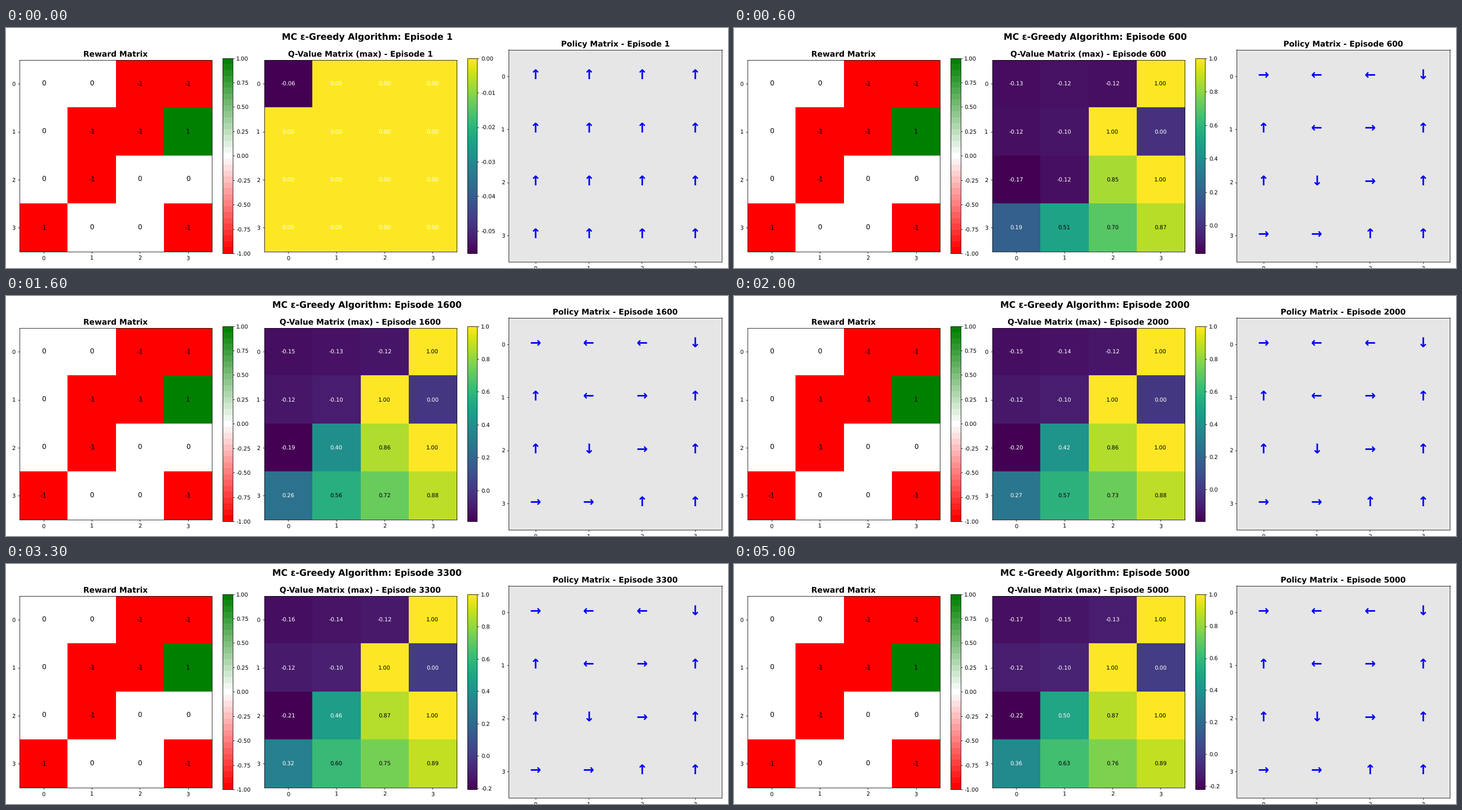
A matplotlib script for the animation above (5.55 s loop, 1280 by 427 pixels).

```python
import numpy as np
import matplotlib.pyplot as plt
from matplotlib.animation import FuncAnimation
from matplotlib.colors import LinearSegmentedColormap

W, H, DPI = 1280, 427, 64
S = W / 18 / DPI          # point sizes are meant for an 18 inch wide figure
STEPS, HOLD = 100, 11     # learning steps, then ticks on the final state
BATCH = 50                # episodes per step

plt.rcParams.update({
    "font.family": "DejaVu Sans",
    "font.size": 10 * S,
    "text.hinting": "no_hinting",
    "axes.linewidth": 0.8 * S,
    "axes.titlesize": 14 * S,
    "axes.titleweight": "bold",
    "axes.titlepad": 6 * S,
    "axes.unicode_minus": False,
})
for axis in ("xtick", "ytick"):
    plt.rcParams.update({
        f"{axis}.major.size": 3.5 * S,
        f"{axis}.major.pad": 3.5 * S,
        f"{axis}.major.width": 0.8 * S,
    })

REWARD = np.array([[0, 0, -1, -1],
                   [0, -1, -1, 1],
                   [0, -1, 0, 0],
                   [-1, 0, 0, -1]])
POLICY = ["→←←↓", "↑←→↑", "↑↓→↑", "→→↑↑"]

# Learned values approach LIMIT as a power of the episode count:
# the weaker the value, the slower it settles.
LIMIT = np.array([[-.171, -.1526, -.1252, 1],
                  [-.12, -.1, 1, 0],
                  [-.22, .499, .87, 1],
                  [.36, .63, .76, .89]])
POWER = np.where(LIMIT > 0, 0.73 * (1 - LIMIT) ** 2,
                 np.clip(4 * (-LIMIT - 0.12), 0, 0.13))

# Cells are explored outwards from the top left corner
DIST = np.add.outer(range(4), range(4))
FOUND = DIST.copy()
FOUND[2, 1] = 13          # its good route opens late


def episode_at(step):
    return max(1, BATCH * step)


def q_matrix(step):
    learned = LIMIT * (episode_at(step) / (BATCH * STEPS)) ** POWER
    wander = -0.01 * step * (LIMIT != 0)
    return np.where(step >= FOUND, learned, wander) + 0.0


fig = plt.figure(figsize=(W / DPI, H / DPI), dpi=DPI, facecolor="white")

X0, PITCH, BOX, MID = 23.9, 433.7, 377.6, 227.3
SIDE, BAR = BOX * 0.904, BOX * 0.046


def panel(x, w, h):
    """Axes placed in pixels, centred on the common middle line."""
    return fig.add_axes([x / W, 1 - (MID + h / 2) / H, w / W, h / H])


def grid_axes(col, side):
    ax = panel(X0 + col * PITCH, side, side)
    ax.set(xlim=(-.5, 3.5), ylim=(3.5, -.5), xticks=range(4), yticks=range(4))
    return ax


def heatmap(col, data, cmap):
    ax = grid_axes(col, SIDE)
    im = ax.imshow(data, cmap=cmap, aspect="auto")
    cax = panel(X0 + col * PITCH + BOX - BAR, BAR, 20 * BAR)
    fig.colorbar(im, cax=cax)
    return ax, im


def cell_texts(ax, size, lift=0, **style):
    return {(r, c): ax.text(c, r - lift, "", ha="center", va="center",
                            fontsize=size * S, **style)
            for r in range(4) for c in range(4)}


suptitle = fig.suptitle("", fontsize=16 * S, fontweight="bold")

red_green = LinearSegmentedColormap.from_list(
    "reward", ["red", "white", "green"], N=33)
reward_ax, _ = heatmap(0, REWARD, red_green)
reward_ax.set_title("Reward Matrix")
for cell, txt in cell_texts(reward_ax, 12, color="black").items():
    txt.set_text(str(REWARD[cell]))

q_ax, q_im = heatmap(1, q_matrix(0), "viridis")
q_texts = cell_texts(q_ax, 10)

policy_ax = grid_axes(2, BOX)
policy_ax.set_facecolor("0.9")
arrows = cell_texts(policy_ax, 24, lift=0.012, color="blue", fontweight="bold")


def update(i):
    step = min(i, STEPS)
    episode = episode_at(step)
    q = q_matrix(step)

    suptitle.set_text(f"MC ε-Greedy Algorithm: Episode {episode}")
    q_ax.set_title(f"Q-Value Matrix (max) - Episode {episode}")
    policy_ax.set_title(f"Policy Matrix - Episode {episode}")

    q_im.set_data(q)
    q_im.set_clim(q.min(), q.max())
    for cell, txt in q_texts.items():
        txt.set_text(f"{q[cell]:.2f}")
        txt.set_color("black" if q[cell] > 0.5 else "white")
    for (r, c), txt in arrows.items():
        txt.set_text(POLICY[r][c] if step > DIST[r, c] else "↑")
    return []


anim = FuncAnimation(fig, update, frames=STEPS + HOLD, interval=50,
                     repeat=True, blit=False)
plt.show()
```
